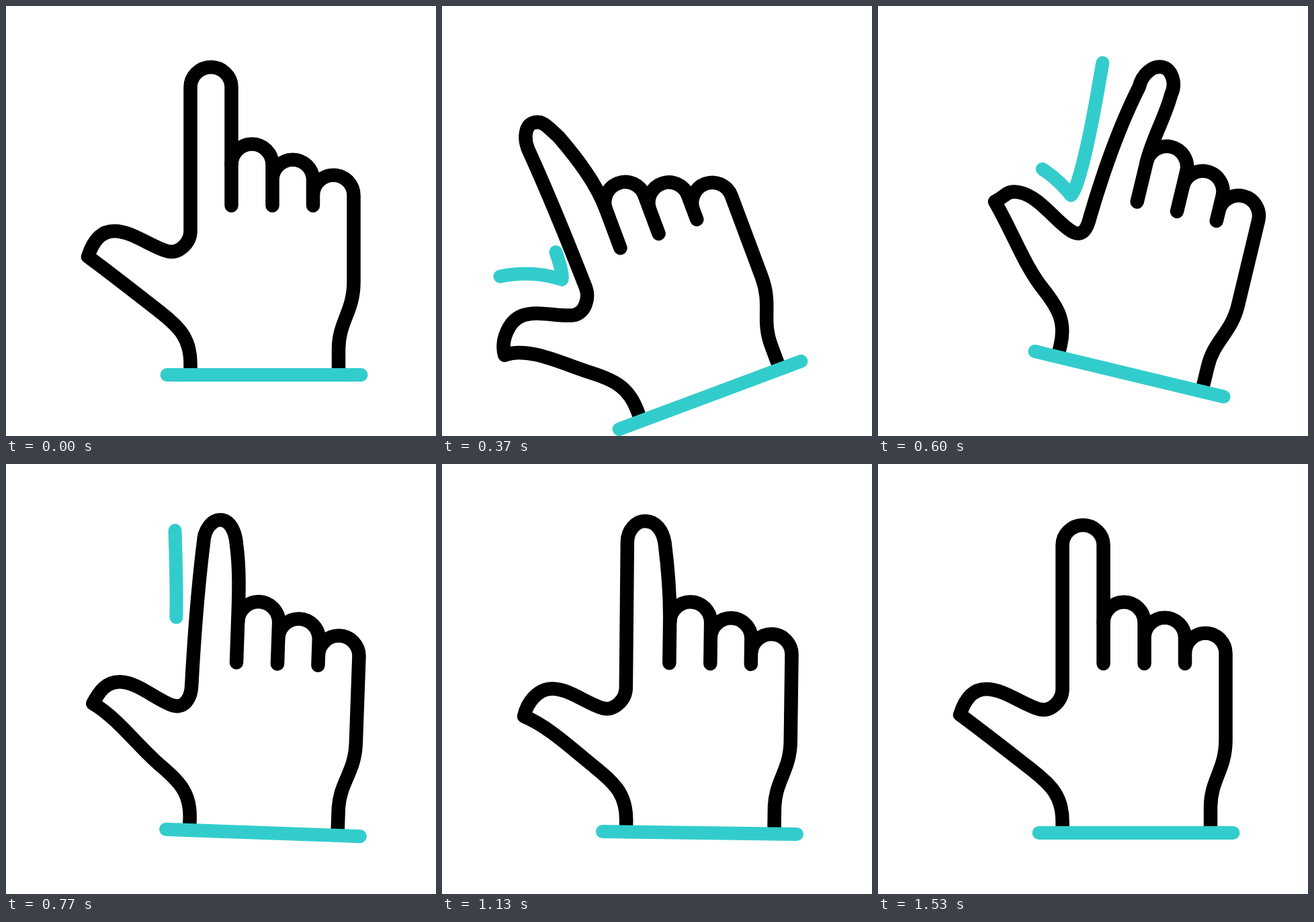
These frames come from a looping animation (640 by 640 pixels, 1670 ms). An HTML page:

```html
<!DOCTYPE html>
<html lang="en">
<head>
<meta charset="utf-8">
<title>Swipe gesture</title>
<style>
  html, body { margin: 0; width: 100%; height: 100%; overflow: hidden; background: #fff; }
  svg { display: block; width: 100vw; height: 100vh; }
  path { fill: none; stroke: #000; stroke-width: 20.5; stroke-linecap: round; stroke-linejoin: round; }
  .accent { stroke: #3cc; stroke-width: 20; }
</style>
</head>
<body>
<svg viewBox="0 0 640 640">
  <g id="hand">
    <path id="trail" class="accent" d="M153 274C185 279 213 291 237.5 310.5C243 305 244 270 243.5 233C243 190 240 150 237 104"/>
    <path d="M335.5 236A30.5 30.5 0 0 1 396.5 236V297M396.5 259A30.25 30.25 0 0 1 457 259V297M457 282A30.25 30.25 0 0 1 517.5 282V411C517.5 455 495 470 495 511V540"/>
    <path id="outline"/>
    <path class="accent" d="M239.5 549H528.5"/>
  </g>
</svg>
<script>
const LOOP = 1670, FPS = 30;
const $ = id => document.getElementById(id);
const hand = $('hand'), trail = $('trail'), outline = $('outline');
const trailLength = trail.getTotalLength();

const mix = (a, b, k) => a + (b - a) * k;

function ease(from, to, f) {
  const t = Math.min(1, Math.max(0, (f - from) / (to - from)));
  return t * t * (3 - 2 * t);
}

// Eases from value to value, reaching each at its frame
const track = (frames, values) => f => values.reduce((v, next, i) =>
  i && f > frames[i - 1] ? mix(values[i - 1], next, ease(frames[i - 1], frames[i], f)) : v);

const armBeats = [2, 10, 18, 28, 38, 46];
const digitBeats = [2, 10, 18, 29.4, 38, 46];
const angle = track(armBeats, [0, -22, 13.5, -9.4, 6.3, 0]);
const drop = track([2, 10, 18], [0, 34.5, 0]);
const bend = track(digitBeats, [0, -24, 18, -27, 10, 0]);
const swing = track(digitBeats, [0, 15, -27, 21, -6, 0]);
const flex = track(digitBeats, [0, 1, 1, 1, 0, 0]);

const curve = (...p) => 'C' + p.map(v => v.toFixed(2)).join(' ');

// Wrist to the start of the index finger
function thumb(swing, flex, bx, by) {
  const hx = 122 - .28 * swing, hy = 373 + swing;
  const sx = 161 + 3 * flex, sy = 335 + .4 * swing;
  const wx = 240 - .45 * swing, wy = 365 + .08 * swing;
  return 'M274.5 540V532' +
    curve(274.5, 495, 258, 478, 230, 456) +
    curve(194, 428, hx + 38, 401 - 15 * flex, hx, hy) +
    curve(hx + 6 - .3 * swing, mix(hy, sy, .5), sx - 22, sy, sx, sy) +
    curve(mix(sx, wx, .34), sy, wx - 25, wy - 7, wx, wy) +
    curve(wx + 18, wy + 4.5, bx, by + 17, bx, by);
}

// Flexing narrows and stretches the finger, bending shifts its tip
function finger(bend, flex, bx, by) {
  const jx = 335.5, jy = 236;
  const lx = 274.5 + bend + 6 * flex, rx = jx + bend - 6 * flex;
  const y = 121 + .5 * bend;
  const tx = 305 + 1.2 * bend, ty = 91 + .4 * bend - 5 * flex;
  return curve(mix(bx, lx, .15), mix(by, y, .38), mix(bx, lx, .5), mix(by, y, .73), lx, y) +
    curve(lx, mix(y, ty, .55), mix(tx, lx, .55), ty, tx, ty) +
    curve(mix(tx, rx, .55), ty, rx - .35 * (jx - rx), mix(y, ty, .55), rx, y) +
    curve(mix(rx, jx, .4) + 4 * flex, mix(y, jy, .33), jx, mix(y, jy, .67), jx, jy) +
    'V297';
}

function draw(now) {
  const f = Math.floor((now % LOOP + 3.4) * FPS / 1000);
  const bent = bend(f), flexed = flex(f);
  const bx = 274.5 - 4.5 * flexed + .15 * bent, by = 335 - flexed;
  hand.setAttribute('transform', `translate(0 ${drop(f)}) rotate(${angle(f)} 384 506)`);
  outline.setAttribute('d', thumb(swing(f), flexed, bx, by) + finger(bent, flexed, bx, by));

  const head = ease(4, 19, f), tail = ease(14.8, 29.8, f);
  const visible = head > tail;
  trail.style.visibility = visible ? 'visible' : 'hidden';
  if (visible) {
    trail.style.strokeDasharray = `${(head - tail) * trailLength} ${2 * trailLength}`;
    trail.style.strokeDashoffset = -tail * trailLength;
  }
}

let start;
function tick(now) {
  start ??= now;
  draw(now - start);
  requestAnimationFrame(tick);
}
draw(0);
requestAnimationFrame(tick);
</script>
</body>
</html>
```
